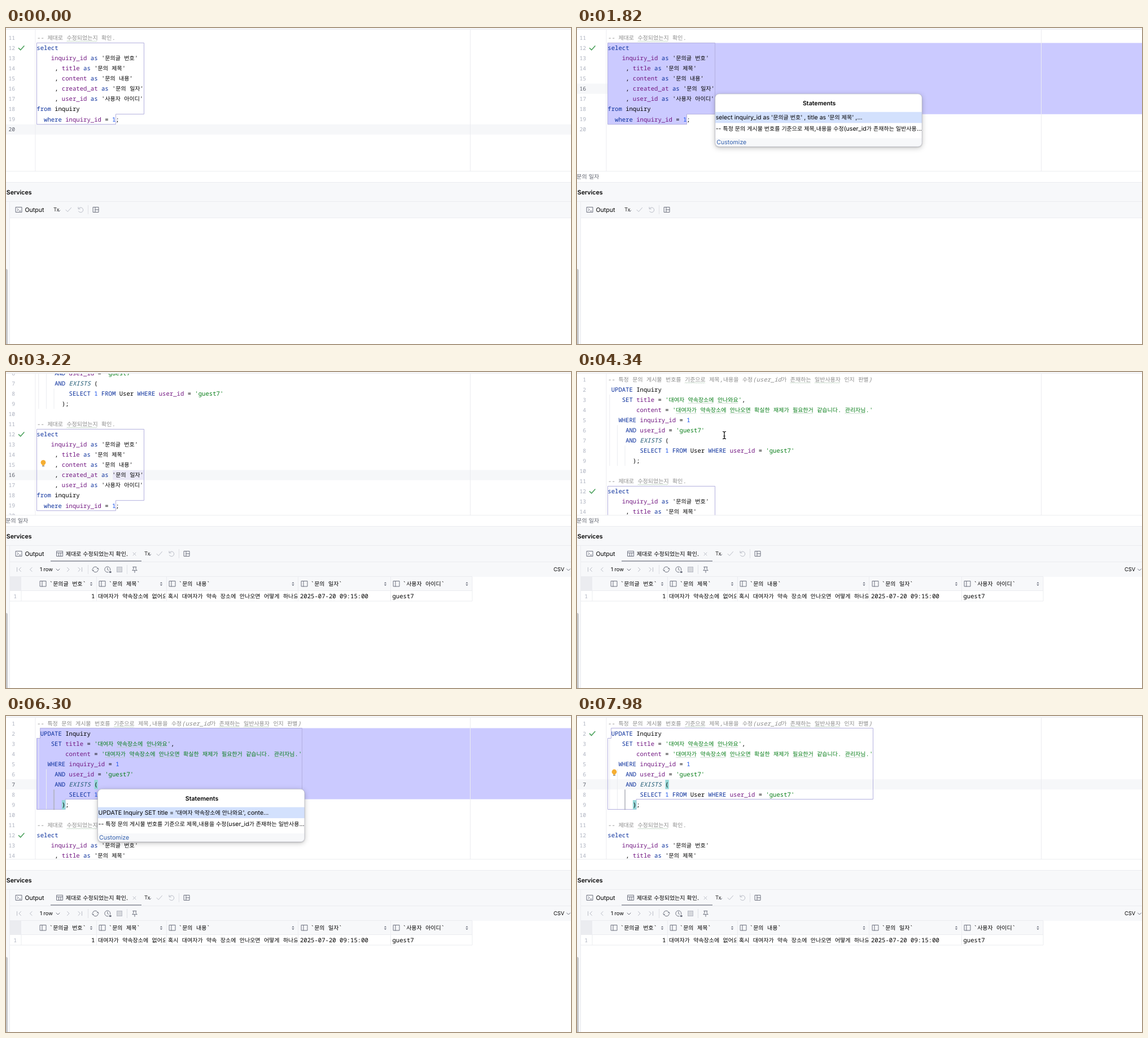
Recreate the animation shown at these times as an HTML page. Size 1001x560 px, loop 8000 ms.

```html
<!DOCTYPE html>
<html lang="ko">
<head>
<meta charset="utf-8">
<title>SQL console</title>
<style>
html, body { margin: 0; width: 100%; height: 100%; overflow: hidden; background: #fff; }
svg { display: block; }
text { white-space: pre; text-rendering: geometricPrecision; }
.ui { font: 10.62px Inter, sans-serif; }
.small { font: 9.4px Inter, sans-serif; }
.bold { font: 600 10.62px Inter, sans-serif; }
.mono { font: 10.61px "Noto Sans Mono", monospace; }
.num { font: 9.7px "Noto Sans Mono", monospace; text-anchor: end; fill: #aeb3c0; }
.num.on { fill: #5c606c; }
.it { font-style: italic; }
.ko { font: 10px "Noto Sans CJK KR", "Noto Sans CJK", sans-serif; }
.ico { fill: none; stroke: #6c707e; stroke-width: 1; stroke-linecap: round; stroke-linejoin: round; }
.dim { stroke: #b9bcc6; }
.line { fill: none; stroke: #ebecf0; }
.box { fill: none; stroke: #b3b0de; }
.sel { fill: #cbcaff; }
.pop { filter: drop-shadow(0 1px 1px rgba(0,0,0,.2)) drop-shadow(0 2px 5px rgba(0,0,0,.24)); }
</style>
</head>
<body>
<svg id="stage" width="1001" height="560" viewBox="0 0 1001 560"></svg>
<script>
(() => {
const LOOP = 8000, STEP = 70;
const LEFT = 54.3, PITCH = 18.04, CHAR = 6.366, HANGUL = 9.2;
const MEMBER = 'guest7';
const PANEL = '#f7f8fa';

const CODE = [
  '-- 특정 문의 게시물 번호를 기준으로 제목,내용을 수정(user_id가 존재하는 일반사용자 인지 판별)',
  ' UPDATE Inquiry',
  "    SET title = '대여자 약속장소에 안나와요',",
  "        content = '대여자가 약속장소에 안나오면 확실한 재제가 필요한거 같습니다. 관리자님.'",
  '   WHERE inquiry_id = 1',
  `     AND user_id = '${MEMBER}'`,
  '     AND EXISTS (',
  `         SELECT 1 FROM User WHERE user_id = '${MEMBER}'`,
  '       );',
  '',
  '-- 제대로 수정되었는지 확인.',
  'select',
  "    inquiry_id as '문의글 번호'",
  "     , title as '문의 제목'",
  "     , content as '문의 내용'",
  "     , created_at as '문의 일자'",
  "     , user_id as '사용자 아이디'",
  'from inquiry',
  '  where inquiry_id = 1;',
  ''
];
const TYPOS = {
  1: '기준으로 존재하는 일반사용자',
  3: '약속장소에 안나와요',
  4: '대여자가 약속장소에 안나오면 필요한거 관리자님',
  11: '수정되었는지'
};
const KEYWORDS = /^(select|as|from|where|update|set|and)$/i;
const COLUMNS = /^(inquiry_id|title|content|created_at|user_id)$/;

const mid = n => 13 + (n - 1) * PITCH;
const rowTop = n => mid(n) - PITCH / 2;
const isKo = c => /[가-힣]/.test(c);
const width = s => [...s].reduce((w, c) => w + (isKo(c) ? HANGUL : CHAR), 0);

// Small markup helpers
const text = (s, x, y, cls = 'ui', fill = '#000', extra = '') =>
  `<text x="${x}" y="${y}" class="${cls}" fill="${fill}" ${extra}>` +
  s.replace(/[가-힣]+/g, '<tspan class="ko">$&</tspan>') + '</text>';
const rect = (x, y, w, h, fill, extra = '') =>
  `<rect x="${x}" y="${y}" width="${w}" height="${h}" fill="${fill}" ${extra}/>`;
const path = (d, cls = 'ico', extra = '') => `<path d="${d}" class="${cls}" ${extra}/>`;
const group = (id, body, extra = '') => `<g id="${id}" ${extra}>${body}</g>`;

function style(token, alias) {
  if (token.startsWith('--')) return ['#8c8c8c', 'mono it'];
  if (token[0] === "'") return [alias ? '#000' : '#067d17', 'mono'];
  if (/^\d/.test(token)) return ['#1750eb', 'mono'];
  if (token === 'EXISTS') return ['#1f5873', 'mono it'];
  if (KEYWORDS.test(token)) return ['#0a2f9c', 'mono'];
  if (COLUMNS.test(token)) return ['#711580', 'mono'];
  return ['#000', 'mono'];
}

function codeLine(s, i) {
  let x = LEFT, out = '';
  for (const token of s.match(/--.*|'[^']*'|\d+|\w+|\s+|./g) || []) {
    const [fill, cls] = style(token, i > 10);
    if (token.trim()) out += text(token, x.toFixed(2), (mid(i + 1) + 3.8).toFixed(2), cls, fill);
    x += width(token);
  }
  for (const word of (TYPOS[i + 1] || '').split(' ').filter(Boolean)) {
    const from = LEFT + width(s.slice(0, s.indexOf(word)));
    const waves = Math.round(width(word) / 3);
    out += path(`M${from} ${mid(i + 1) + 6.8}` + 'l1.5 -1.4 1.5 1.4'.repeat(waves), 'line',
      'style="stroke:#b4cdb8;stroke-width:.8"');
  }
  return out;
}

const selectBox = `M54.5 ${rowTop(12)}H244.5V${rowTop(19)}H194.5V${rowTop(20)}H54.5Z`;
const updateBox = 'M60.5 21.5H524.5V147.5H105V165.5H54.5V39.5H60.5Z';
const check = 'M22.5 .3l3.2 3.2 6.2-7';
const bulb = '<circle cx="66" cy="-4.2" r="4.4" fill="#f5ae33"/>' +
  rect(64, -.6, 4, 1.6, '#f5ae33') + rect(64, 1.4, 4, 1.3, '#7a7d87');

function editor() {
  const guide = (x, a, b) => path(`M${x} ${rowTop(a)}V${rowTop(b)}`, 'line');
  const teal = (x, n) => rect(x, rowTop(n) + .8, 6.4, 16.6, '#95d8d8');
  return group('doc',
    rect(0, 0, 1001, PITCH, '#f6f7f9', 'id="row"') +
    group('alias', rect(189, rowTop(16) + .5, 55, 17, '#ebe9f8')) +
    group('sel1', path(`M54 ${rowTop(12)}H1001V${rowTop(19)}H194.5V${rowTop(20)}H54Z`, 'sel')) +
    group('sel2', path('M60 21.5H1001V147.5H105V165.5H54V39.5H60Z', 'sel')) +
    guide(57.8, 3, 10) + guide(71.5, 6, 10) + guide(85, 8, 10) +
    group('box1', path(selectBox, 'box')) + group('box2', path(updateBox, 'box')) +
    group('match', teal(156.4, 7) + teal(98.9, 9) +
      path(`M85 ${rowTop(8)}V${rowTop(10)}`, 'line', 'style="stroke:#8f939e"')) +
    CODE.map(codeLine).join('') +
    CODE.map((_, i) => text(String(i + 1), 16, mid(i + 1) + 3.5, 'num', '#aeb3c0', `id="n${i + 1}"`)).join('') +
    group('check', path(check, 'ico', 'style="stroke:#4fa35f;stroke-width:1.7"')) +
    group('bulb', bulb) +
    rect(0, 0, 1.5, 15.5, '#000', 'id="caret"')
  );
}

function tools() {
  return group('tools',
    text('Tx', 84, 325.2, 'small', '#222') + path('M92.5 324l1.2 1.3 2-2.3') +
    path('M106 322.3l3.2 3.2 6.3-7', 'ico dim') +
    path('M128 317.5v3.2h3.2M128.3 320.5a4.4 4.4 0 1 1 .2 4.2', 'ico dim') +
    path('M145.5 314v16', 'line', 'style="stroke:#dfe1e6"') +
    path('M154.5 317.5h9.5v9h-9.5zM158 317.5v9M158 322h6'));
}

function results() {
  const grid = [160.5, 284.5, 517.5, 681.5, 826];
  const names = ['문의글 번호', '문의 제목', '문의 내용', '문의 일자', '사용자 아이디'];
  const icons = [60.5, 165.5, 289.5, 523.5, 686.5];
  const sorters = [151, 275, 508.5, 672, 816.5];
  let s = path('M90 317.5h10.5v9h-10.5zM90 320.5h10.5M93.5 320.5v6M97 320.5v6') +
    text('제대로 수정되었는지 확인.', 105.7, 325.8) +
    path('M225 320l5 5M230 320l-5 5', 'ico dim') +
    rect(79, 334, 161, 2, '#a3a6af') +
    rect(7, 337, 994, 26, PANEL) +
    path('M19.5 346.5v7M26.5 346.5l-3.5 3.5 3.5 3.5M46 346.5l-3.5 3.5 3.5 3.5' +
      'M108.5 346.5l3.5 3.5-3.5 3.5M128 346.5l3.5 3.5-3.5 3.5M134.5 346.5v7', 'ico dim') +
    text('1 row', 60, 353.3, 'small') + path('M89 349l3 3 3-3') +
    path('M145.5 342v16M214.5 342v16', 'line', 'style="stroke:#dfe1e6"') +
    path('M153.5 349a4.8 4.8 0 0 1 9-1.2M163.3 351a4.8 4.8 0 0 1-9 1.2M164 350l-.7-2.2-2 1M152.8 350l.7 2.2 2-1') +
    path('M184.6 351.5a5 5 0 1 0-3.2 3.2M179.8 347v3.3l2 1.2') +
    rect(183, 353, 3.5, 3, '#6c707e') +
    rect(196.5, 345.5, 9, 9, '#d6d8dd', 'stroke="#b9bcc6"') +
    path('M225 345.5h6l-.8 1v3l2 2.2h-8.4l2-2.2v-3zM228 352v3.5') +
    text('CSV', 970, 353.3, 'small') + path('M993.5 349l3 3 3-3') +
    rect(7, 363, 819, 24, PANEL) + rect(7, 363, 20, 24, '#ebecf0') +
    path('M7 362.5H826M7 387.5H826M7 406H826M27 387V406' + grid.map(x => `M${x} 363V406`).join(''), 'line') +
    text('1', 19, 400.5, 'num');
  names.forEach((name, i) => {
    const x = icons[i], end = sorters[i];
    s += path(`M${x} 370.5h10.5v9.5h-10.5zM${x + 3.5} 370.5v9.5`) +
      text('`' + name + '`', x + 16.3, 379.3, 'mono') +
      path(`M${end - 2.2} 374.6h4.4l-2.2-2.4zM${end - 2.2} 376.6h4.4l-2.2 2.4z`, '', 'fill="#6c707e"');
  });
  const cell = (t, x, clip = '') => text(t, x, 400.8, 'mono', '#000', clip && `clip-path="url(#${clip})"`);
  return group('results', s + cell('1', 151) + cell('대여자가 약속장소에 없어요', 163, 'c1') +
    cell('혹시 대여자가 약속 장소에 안나오면 어떻게 하나요', 287, 'c2') +
    cell('2025-07-20 09:15:00', 521) + cell(MEMBER, 684.5));
}

const spinner = group('spin', [...Array(8).keys()].map(i =>
  `<path d="M0 -6.3V-10" transform="rotate(${i * 45})" stroke="#a9acb5" stroke-width="2.7" stroke-linecap="round"/>`
).join(''), 'transform="translate(567.6 487.7)"');

function popup(id, x, y, first) {
  return group(id,
    rect(0, 0, 366.5, 93.5, '#fff', 'rx="7" class="pop"') +
    path('M0 78.5H366.5V86.5a7 7 0 0 1-7 7H7a7 7 0 0 1-7-7Z', '', `fill="${PANEL}"`) +
    rect(0, 32, 366.5, 19.5, '#d3e1fd') +
    rect(0, 0, 366.5, 93.5, 'none', 'rx="7" stroke="#b9bbc4" stroke-width=".7"') +
    text('Statements', 184.5, 20.2, 'bold', '#000', 'text-anchor="middle"') +
    text(first, 1, 45.6) +
    text(CODE[0].slice(0, CODE[0].indexOf('자 인지')) + '...', 1, 65.4) +
    text('Customize', 2.5, 89, 'ui', '#315fae'),
    `transform="translate(${x} ${y})"`);
}

const beam = 'M-3 -6.5Q0 -6.5 0 -4.5Q0 -6.5 3 -6.5M0 -4.5V4.5M-3 6.5Q0 6.5 0 4.5Q0 6.5 3 6.5M-1.5 1.5H1.5';
const mouse = group('mouse',
  group('beam', path(beam, '', 'fill="none" stroke="#fff" stroke-width="2.6"') +
    path(beam, '', 'fill="none" stroke="#000" stroke-width="1.2"')) +
  group('arrow', path('M0 0V12.5L3 9.8 5 14.2 7 13.3 5.1 9H9Z', '', 'fill="#000" stroke="#fff"')));

document.getElementById('stage').innerHTML =
  '<defs><clipPath id="ed"><rect y="3" width="1001" height="251"/></clipPath>' +
  '<clipPath id="c1"><rect x="161" y="388" width="121.5" height="18"/></clipPath>' +
  '<clipPath id="c2"><rect x="285" y="388" width="231" height="18"/></clipPath></defs>' +
  rect(0, 0, 1001, 560, '#fff') +
  `<g clip-path="url(#ed)">${editor()}` + path('M51.9 3V254M822.5 3V254', 'line') + '</g>' +
  rect(0, 0, 1001, 2, PANEL) + path('M0 2.5H1001M0 253.9H1001', 'line') +
  group('crumb', text('문의 일자', -.7, 267.4, 'ui', '#5f636e')) +
  rect(0, 273, 1001, 63, PANEL) + rect(0, 308, 6, 252, PANEL) +
  path('M0 273.5H1001M0 307.5H1001M6.5 308V560M7 336.5H1001', 'line') +
  rect(-3, 427, 6, 140, '#c6c7ca', 'rx="3"') +
  text('Services', .8, 294.9, 'bold') +
  path('M17.5 317.5h10.5v9h-10.5zM20 320l2 2-2 2M23.5 324.3h2.5') +
  text('Output', 33.4, 325.9) +
  tools() + results() + spinner +
  popup('pop1', 244.7, 116.8, "select inquiry_id as '문의글 번호' , title as '문의 제목' ,...") +
  popup('pop2', 162.5, 129.6, "UPDATE Inquiry SET title = '대여자 약속장소에 안나와요', conte...") +
  mouse;

const ids = {};
document.querySelectorAll('#stage [id]').forEach(e => { ids[e.id] = e; });
const show = (id, on) => { ids[id].style.display = on ? '' : 'none'; };
const move = (id, x, y) => ids[id].setAttribute('transform', `translate(${x} ${y})`);

// Linear interpolation between [time, ...values] keys
function track(keys, t) {
  let i = 1;
  while (i < keys.length - 1 && keys[i][0] < t) i++;
  const a = keys[i - 1], b = keys[i];
  const k = Math.min(1, Math.max(0, (t - a[0]) / (b[0] - a[0])));
  return a.slice(1).map((v, j) => v + (b[j + 1] - v) * k);
}

const SCROLL = [[3010, 176], [3080, 168], [3220, 101], [3360, 38], [3430, 18], [3570, 0]];
const MOUSE_A = [[70, 489, 545], [210, 430, 400], [350, 345, 190], [490, 285, 58], [560, 266, 90], [630, 261, 112]];
const MOUSE_B = [[4340, 261, 112], [4550, 225, 128], [4760, 190, 122], [4830, 190, 122],
  [4970, 290, 75], [5110, 371, 34], [5180, 371, 34], [5390, 352, 62]];

function draw(ms) {
  const t = Math.floor(ms / STEP) * STEP;
  const within = (a, b) => t >= a && t < b;
  const first = within(1820, 2170), second = within(6160, 6930);
  const line = t < 630 ? 20 : t < 4830 ? 16 : 7;

  move('doc', 0, -Math.round(track(SCROLL, t)[0]));
  ids.row.setAttribute('y', rowTop(line));
  [7, 16, 20].forEach(n => ids['n' + n].classList.toggle('on', n === line));
  show('alias', line === 16);
  show('match', line === 7);
  show('box1', t < 5600);
  show('box2', t >= 5600);
  show('sel1', first);
  show('pop1', first);
  show('sel2', second);
  show('pop2', second);
  move('check', 0, mid(t < 7000 ? 12 : 2));
  show('bulb', within(3080, 4830) || t >= 7770);
  move('bulb', 0, mid(t < 4830 ? 15 : 6));

  show('caret', within(630, 1540) || within(2170, 2800) || within(4830, 6160) || within(7070, 7980));
  ids.caret.setAttribute('x', line === 16 ? 244.3 : 162.8);
  ids.caret.setAttribute('y', mid(line) - 7.8);

  show('crumb', within(840, 5250));
  show('results', t >= 2240);
  move('tools', t >= 2240 ? 161 : 0, 0);
  show('spin', within(2240, 2800));
  const phase = [2310, 2520, 2660].filter(x => t >= x).length;
  [...ids.spin.children].forEach((e, i) => e.setAttribute('opacity', 1 - ((i + 8 - phase) % 8) * .06));

  const [x, y] = track(t < 4340 ? MOUSE_A : MOUSE_B, t);
  show('mouse', within(70, 1820) || within(4340, 6160));
  move('mouse', x, y);
  show('beam', y < 254);
  show('arrow', y >= 254);
}

const start = performance.now();
function tick() {
  draw((performance.now() - start) % LOOP);
  requestAnimationFrame(tick);
}
tick();
})();
</script>
</body>
</html>
```
